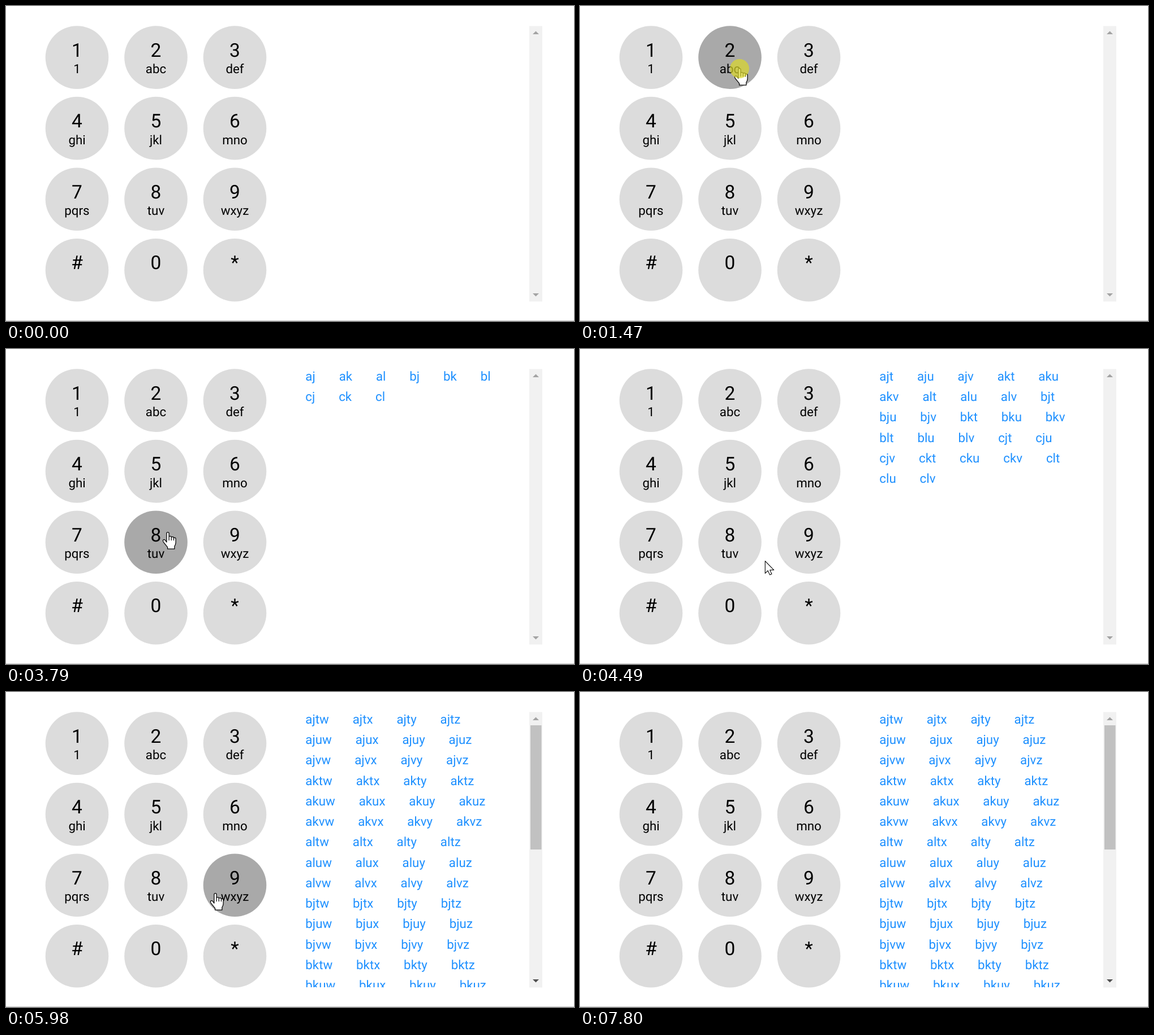
An HTML page that plays this animation: 1004x558 px, repeating every 8 s.

```html
<!DOCTYPE html>
<html lang="en">
<head>
<meta charset="utf-8">
<title>Keypad combinations</title>
<style>
html, body { margin: 0; width: 100%; height: 100%; overflow: hidden; background: #fff; }
body { position: relative; font-family: Roboto, Arial, sans-serif; text-rendering: geometricPrecision; }
svg { position: absolute; left: 0; top: 0; display: block; }
#list {
  position: absolute; left: 529.3px; top: 30.8px; width: 395px; height: 492.5px;
  overflow: hidden; white-space: nowrap; color: #1e90ff;
  font-size: 22.32px; line-height: 36.27px;
}
#list div { height: 36.27px; }
#list span { margin-right: 41.85px; }
text { text-anchor: middle; }
.digit { font-size: 33.48px; }
.sub { font-size: 22.32px; }
.cursor { fill: #fff; stroke: #000; stroke-linejoin: round; stroke-linecap: round; }
</style>
</head>
<body>
<div id="list"></div>
<svg width="1004" height="558" viewBox="0 0 1004 558">
  <rect y="557" width="1004" height="1" fill="#c8c8c8"/>
  <g id="keys"></g>
  <rect x="925" y="35.5" width="23" height="488" fill="#f1f1f1"/>
  <rect id="thumb" x="927" y="59" width="19.5" height="220" fill="#c1c1c1"/>
  <path d="M931 50 L936.5 44.5 L942 50Z" fill="#a3a3a3"/>
  <path id="down" d="M931 509 L936.5 514.5 L942 509Z"/>
  <path id="arrow" class="cursor" stroke-width="1.1"
    d="M.5 .5 V22.3 L5.4 17.6 L8.8 25 L12.2 23.5 L9 16.4 H16Z"/>
  <g id="hand"><path class="cursor" transform="scale(1.395) translate(-6.5 -.7)" stroke-width=".9"
    d="M5 13 V2 Q5 .5 6.5 .5 Q8 .5 8 2 V6.5 Q8 5.5 9.5 5.5 Q11 5.5 11 7 Q11 6.2 12.5 6.2
       Q14 6.2 14 8 Q14 7.2 15.2 7.2 Q16.6 7.2 16.6 9 V13.5 Q16.6 16 15 18.3 V21.6 H6.2 V19.5
       L1 13 Q0 11.5 .5 10.3 Q1.8 9 3.2 10.5Z M8 6.5 V10.5 M11 7 V10.5 M14 8 V10.5"/></g>
  <circle id="click" r="17" fill="rgba(220,217,42,.7)"/>
</svg>
<script>
const LOOP = 8000, STEP = 77, RADIUS = 55.8;
const ENTER = 230, LEAVE = 7800, ENTRY = [555, 326];
const $ = id => document.getElementById(id);

const labels = ['1 1', '2 abc', '3 def', '4 ghi', '5 jkl', '6 mno',
                '7 pqrs', '8 tuv', '9 wxyz', '#', '0', '*'];

function add(tag, attrs, text = '') {
  const el = document.createElementNS('http://www.w3.org/2000/svg', tag);
  for (const name in attrs) el.setAttribute(name, attrs[name]);
  el.textContent = text;
  return $('keys').appendChild(el);
}

const keys = labels.map((label, i) => {
  const x = 125.5 + (i % 3) * 139.5, y = 91.1 + Math.floor(i / 3) * 125.55;
  const [digit, sub] = label.split(' ');
  const disc = add('circle', { cx: x, cy: y, r: RADIUS });
  add('text', { x, y: y - 1.6, class: 'digit' }, digit);
  add('text', { x, y: y + 27.9, class: 'sub' }, sub);
  return { x, y, disc };
});

// each move slows down into its end point; bend bows the path sideways
const moves = [
  { at: 230, end: 300, to: [415, 266] },
  { at: 550, end: 1070, to: [282, 111] },
  { at: 1780, end: 2170, to: [287, 208] },
  { at: 3030, end: 3410, to: [286, 325] },
  { at: 4040, end: 4200, to: [335, 380] },
  { at: 4490, end: 4900, to: [308, 364] },
  { at: 5130, end: 5350, to: [358, 370], bend: 14 },
  { at: 5610, end: 5760, to: [370, 357] },
  { at: 6290, end: 6440, to: [575, 230] },
  { at: 6680, end: 6760, to: [762, 317] },
  { at: 6990, end: 7550, to: [880, 519], bend: 100 }
];

const presses = [
  { at: 1470, up: 1530, typed: 1530, letters: 'abc' },
  { at: 2550, up: 2650, typed: 2650, letters: 'jkl' },
  { at: 3720, up: 3790, typed: 4040, letters: 'tuv' },
  { at: 5910, up: 5980, typed: 5980, letters: 'wxyz' }
];

function along([x0, y0], [x1, y1], p, bend = 0) {
  const e = 1 - (1 - p) ** 2, dx = x1 - x0, dy = y1 - y0;
  const bow = bend * Math.sin(Math.PI * e) / Math.hypot(dx, dy);
  return [x0 + dx * e - dy * bow, y0 + dy * e + dx * bow];
}

function cursorAt(t) {
  if (t < ENTER || t >= LEAVE) return null;
  let pos = ENTRY;
  for (const { at, end, to, bend } of moves) {
    if (t < at) break;
    const gaps = Math.round((end - at) / STEP);
    const step = Math.floor((t - at) / (end - at) * gaps + 1e-6);
    pos = along(pos, to, Math.min(1, (step + 1) / (gaps + 1)), bend);
  }
  return pos;
}

let shown = -1;
function showList(count) {
  if (count === shown) return;
  shown = count;
  const words = presses.slice(0, count).reduce((list, { letters }) =>
    list.flatMap(word => [...letters].map(c => word + c)), ['']);
  const perRow = 8 - count;
  let html = '';
  for (let i = 0; i < words.length; i += perRow) {
    const row = words.slice(i, i + perRow).map(w => `<span>${w}</span>`);
    html += `<div>${row.join('')}</div>`;
  }
  $('list').innerHTML = html;
  const scrolls = words.length > 100;
  $('thumb').style.display = scrolls ? '' : 'none';
  $('down').setAttribute('fill', scrolls ? '#505050' : '#a3a3a3');
}

function place(id, pos, visible) {
  const el = $(id);
  el.style.display = visible ? '' : 'none';
  if (visible) el.setAttribute('transform', `translate(${pos})`);
}

function draw(t) {
  showList(presses.filter(p => t >= p.typed).length);
  const pos = cursorAt(t);
  const over = pos && keys.find(k => Math.hypot(pos[0] - k.x, pos[1] - k.y) < RADIUS);
  for (const k of keys) k.disc.setAttribute('fill', k === over ? '#a9a9a9' : '#dcdcdc');
  place('arrow', pos, pos && !over);
  place('hand', pos, over);
  place('click', pos, presses.some(p => t >= p.at && t < p.up));
}

function tick() {
  draw(performance.now() % LOOP);
  requestAnimationFrame(tick);
}
tick();
</script>
</body>
</html>
```
